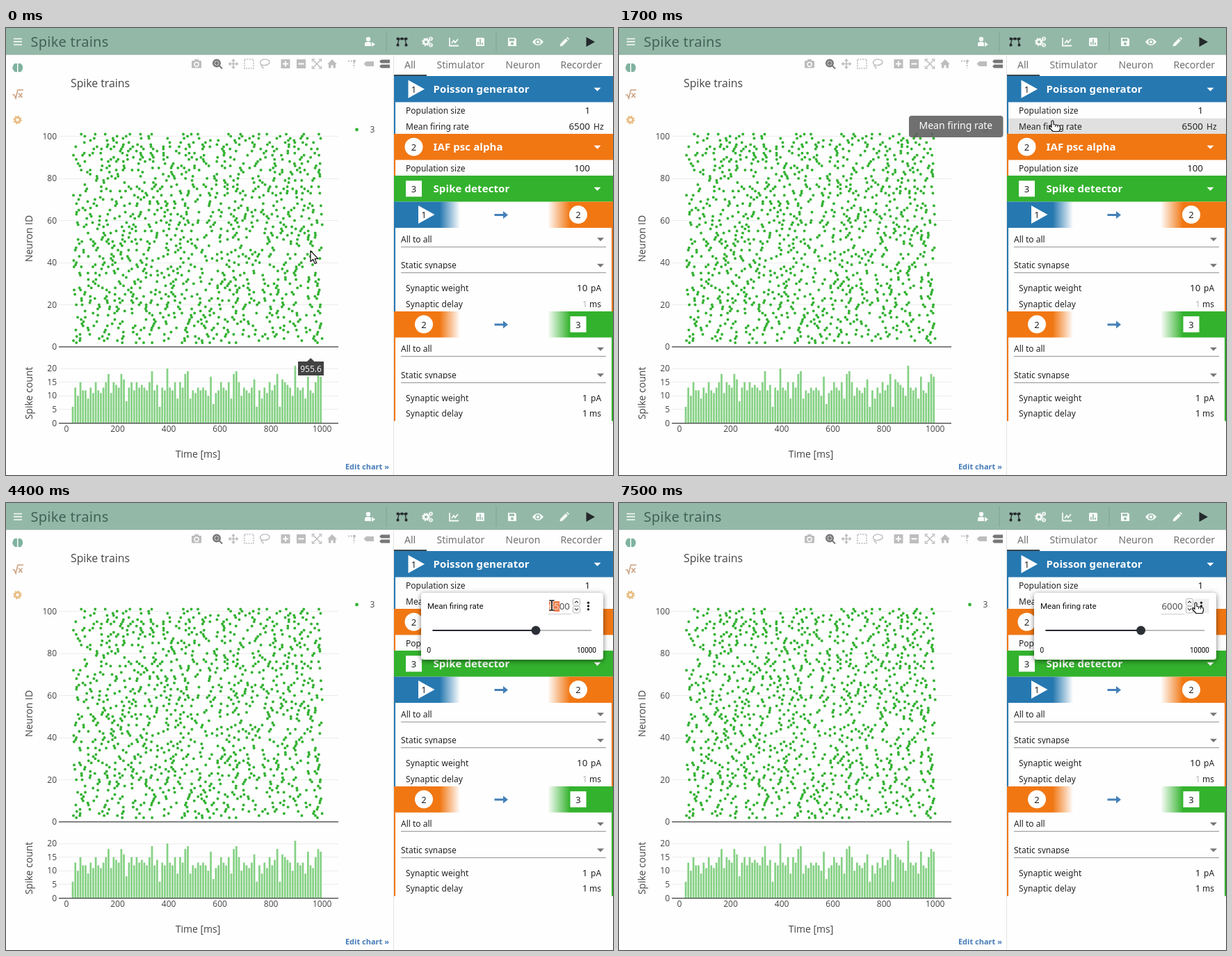
These frames come from a looping animation (873 by 642 pixels, 8 s). An HTML page:

```html
<!DOCTYPE html>
<html lang="en">
<head>
<meta charset="utf-8">
<title>Spike trains</title>
<style>
html, body { margin: 0; width: 100%; height: 100%; overflow: hidden; background: #fff; }
svg { display: block; width: 873px; height: 642px; font: 12px "Noto Sans", "Open Sans", sans-serif; }
.plot { font-family: "Open Sans", "Noto Sans", sans-serif; fill: #444; }
.menu { font-family: Roboto, "Liberation Sans", sans-serif; }
.line { fill: none; stroke-width: 2; }
#pop {
  filter: drop-shadow(0 2px 3px rgba(0,0,0,.35)) drop-shadow(0 1px 5px rgba(0,0,0,.2));
  transform-origin: 597px 129px;
}
</style>
</head>
<body>
<svg id="stage" viewBox="0 0 873 642"></svg>
<script>
const BLUE = '#2678b0', ORANGE = '#f17713', GREEN = '#33b22d', DOT = '#34b233';
const LOOP = 8000, STEP = 100;

const rect = (x, y, w, h, fill, more = '') =>
  `<rect x="${x}" y="${y}" width="${w}" height="${h}" fill="${fill}" ${more}/>`;
const circle = (x, y, r, fill, more = '') =>
  `<circle cx="${x}" cy="${y}" r="${r}" fill="${fill}" ${more}/>`;
const path = (d, fill, more = '') => `<path d="${d}" fill="${fill}" ${more}/>`;
const line = (d, stroke, w = 2, more = '') =>
  `<path class="line" d="${d}" stroke="${stroke}" style="stroke-width:${w}" ${more}/>`;
const text = (x, y, s, more = '') => `<text x="${x}" y="${y}" ${more}>${s}</text>`;
const end = 'text-anchor="end"', mid = 'text-anchor="middle"';
const at = (x, y, body) => `<g transform="translate(${x} ${y})">${body}</g>`;

function random(seed) {
  return () => {
    seed = (seed * 1664525 + 1013904223) % 4294967296;
    return seed / 4294967296;
  };
}

// Icons, each centred on 0,0
const gear = (r, c) => circle(0, 0, r * .62, 'none', `stroke="${c}" stroke-width="${r * .5}"`) +
  circle(0, 0, r * .9, 'none', `stroke="${c}" stroke-width="${r * .35}" stroke-dasharray="${r * .353}"`);
const arrows = c => line('M0-5V5M-5 0H5', c, 1.6) +
  path('M0-7.5L3-4H-3ZM0 7.5L3 4H-3ZM-7.5 0L-4-3V3ZM7.5 0L4-3V3Z', c);

function header() {
  const w = '#f6faf8', d = '#24292b';
  return rect(0, 0, 873, 38, '#94b8a8') + rect(0, 37.5, 873, 1, '#86a99a') +
    line('M11 15.5H23M11 19.7H23M11 24H23', w, 1.7) +
    text(35.5, 27, 'Spike trains', 'font-size="20" letter-spacing=".25" fill="#426057"') +
    rect(546.5, 5, 1, 29, '#7fa293') + rect(704.5, 5, 1, 29, '#7fa293') +
    at(522, 20, circle(-1, -4, 3.2, w) + path('M-6 6V3Q-6 0-3 0H1Q3 0 3 3V6ZM4 0L9 3.5L4 7Z', w)) +
    at(569.5, 20, line('M-5-4.5H5M-4-4Q-6 0-6 4M4-4Q6 0 6 4', d, 1.3) +
      [[-6, -4.5], [6, -4.5], [-6, 4.5], [6, 4.5], [0, -4.5]].map(p => rect(p[0] - 1.8, p[1] - 1.8, 3.6, 3.6, d)).join('')) +
    at(604, 20, gear(5.5, w)) + at(611, 15.5, gear(3, w)) + at(611, 24.5, gear(3, w)) +
    at(644, 20, line('M-6-6V5.5H7M-3 2L0-2L2 1L6-4', w, 1.8)) +
    at(682, 20, rect(-6, -6, 12, 12, w, 'rx="1.5"') + line('M-3 4V0M0 4V-4M3 4V1', '#94b8a8', 1.6)) +
    at(728, 20, path('M-6-6H4L6-4V6H-6Z', w) + rect(-4, -4.5, 7, 3.2, '#94b8a8') + circle(0, 2.5, 2, '#94b8a8')) +
    at(765, 20, path('M-8 0Q0-10 8 0Q0 10-8 0Z', w) + circle(0, 0, 3.6, '#94b8a8') + circle(0, 0, 2, w)) +
    at(803, 20, path('M-6.5 6.5L-5.5 2.5L2-5L5-2L-2.5 5.5ZM3-6L4.5-7L7-4.5L6-3Z', w)) +
    path('M834.5 13V27L847 20Z', d);
}

function sidebar() {
  return path('M16 51V63Q12 64 11 61Q8 58 10 55Q11 50 16 51ZM17.5 51V63Q22 64 23 61Q25 58 24 55Q22 50 17.5 51Z', '#7fb39f') +
    line('M9.5 96H12L14 101L17 89H25M18 93.5L23.5 100M23.5 93.5L18 100', '#cb9f7e', 1.5) +
    at(16.5, 132, gear(5.8, '#e9bd84'));
}

function modebar() {
  const g = '#bdbdbd', d = '#777';
  const box = s => rect(-6.5, -6.5, 13, 13, g) + line(s, '#fff', 2);
  return at(274, 51.5, rect(-7, -4.5, 14, 10.5, g, 'rx="1"') + rect(-3, -6.5, 6, 3, g) +
      circle(0, .8, 3, g, 'stroke="#fff" stroke-width="1.4"')) +
    at(303, 50.5, circle(0, 0, 4.8, '#bbb', `stroke="${d}" stroke-width="2.4"`) + line('M3.5 3.5L8 8M-2.5 0H2.5M0-2.5V2.5', d, 2)) +
    at(327, 51.5, arrows(g)) +
    at(349.5, 51.5, rect(-6.5, -6.5, 13, 13, 'none', `stroke="${g}" stroke-width="1.6" stroke-dasharray="2 1.5"`)) +
    at(372, 50.5, line('M-4 3Q-9-1-4-4.5Q1-7 6-4Q9 0 4 2Q0 4-4 2.5Q-6 4-3 5.5Q-1 7-3 7.5', g, 1.4)) +
    at(402, 51.5, box('M-4 0H4M0-4V4')) + at(424.5, 51.5, box('M-4 0H4')) +
    at(447, 51.5, line('M-6.5-3V-6.5H-3M3-6.5H6.5V-3M6.5 3V6.5H3M-3 6.5H-6.5V3M-5-5L5 5M5-5L-5 5', g, 1.5)) +
    at(469, 51.5, path('M0-6.5L7 .5H5V6H1.5V2H-1.5V6H-5V.5H-7Z', g)) +
    at(497, 51.5, line('M-5-4H3M3.5-2V6', g, 2, 'stroke-dasharray="2 1.6"') + circle(4, -4, 2, g)) +
    at(522, 51.5, path('M-7.5 0L-4-3.5H7V3.5H-4Z', g)) +
    at(545, 51.5, path('M-8-3.5L-5.5-6H7V-1H-5.5ZM-8 3.5L-5.5 1H7V6H-5.5Z', d));
}

const counts = [
  6, 13, 10, 15, 12, 12, 9, 13, 11, 15, 12, 11, 13, 15, 18, 11, 15, 14, 13, 18,
  16, 8, 13, 15, 12, 15, 13, 14, 13, 12, 15, 19, 12, 14, 6, 13, 12, 20, 13, 12,
  15, 9, 15, 13, 18, 19, 9, 12, 11, 13, 12, 13, 12, 10, 17, 7, 11, 12, 15, 13,
  12, 15, 9, 18, 19, 15, 10, 13, 12, 11, 13, 16, 6, 12, 9, 13, 11, 15, 12, 14,
  18, 6, 16, 15, 14, 13, 10, 21, 13, 12, 13, 9, 17, 12, 11, 15, 18, 17
];
const timeX = ms => 87 + ms * .3677;
const idY = id => 458 - id * 3.025;

function spikes() {
  const rnd = random(41), last = Array(102).fill(-99);
  let dots = '', bars = '';
  counts.forEach((n, bin) => {
    const h = n * 3.925;
    bars += rect((timeX(20 + bin * 10) + .3).toFixed(2), 567.5 - h, 2.7, h, '#85d184');
    for (let k = 0; k < n; k++) {
      let id;
      do id = 2 + Math.floor(rnd() * 100); while (bin - last[id] < 3);
      last[id] = bin;
      const x = Math.max(97, timeX(20 + (bin + rnd()) * 10));
      dots += `M${x.toFixed(1)} ${idY(id).toFixed(1)}h0`;
    }
  });
  return bars + line(dots, DOT, 4, 'stroke-linecap="round"');
}

function chart() {
  let s = text(93, 85, 'Spike trains', 'font-size="15.8"');
  const level = (y, label, zero) => {
    s += rect(76, Math.round(y), 402, 1, zero ? 'none' : '#ececec') + text(73, y + 4.5, label, end);
  };
  for (let v = 0; v <= 100; v += 20) level(idY(v) - .5, v, !v);
  for (let v = 0; v <= 20; v += 5) level(567 - v * 3.925, v, !v);
  for (let v = 0; v <= 1000; v += 200) s += text(timeX(v), 580, v, mid);
  s += spikes() + rect(76, 457.3, 402, 1.3, '#444') + rect(76, 567, 402, 1.3, '#444');
  const side = (y, label) => text(0, 0, label, `${mid} font-size="14" transform="translate(38 ${y}) rotate(-90)"`);
  s += side(302.5, 'Neuron ID') + side(524.5, 'Spike count') + text(276, 616.5, 'Time [ms]', mid + ' font-size="14"');
  s += circle(504.5, 146, 2.4, DOT) + text(523.5, 150, '3');
  s += text(551, 634, 'Edit chart »', end + ' font-size="11" font-weight="700" fill="#447bb8"');
  return `<g class="plot">${s}</g>`;
}

const badge = (kind, x, y) =>
  [path(`M${x - 8} ${y - 13}L${x + 15.5} ${y}L${x - 8} ${y + 13}Z`, '#fff'),
   circle(x, y, 13, '#fff'), rect(x - 11.5, y - 11.5, 23, 23, '#fff')][kind - 1] +
  text(x, y + 5, kind, mid + ' font-size="13" fill="#222"');
const caret = (x, y, c) => path(`M${x - 5} ${y - 2.3}H${x + 5}L${x} ${y + 2.7}Z`, c);

const row = (y, label, value, unit = '', valueX = 840, unitX = 845, fill = '#222') =>
  text(575, y, label, 'fill="#222"') +
  text(valueX, y, value, `${end} font-size="13.33" fill="${fill}"`) +
  text(unitX, y, unit, 'fill="#222"');

const synapse = (y, weight, delayFill) => `<g letter-spacing=".1">` +
  row(y, 'Synaptic weight', weight, 'pA', 836.5, 841) +
  row(y + 22.5, 'Synaptic delay', 1, 'ms', 836.5, 839, delayFill) + '</g>';

const node = (y, h, kind, color, name) =>
  rect(558, y, 2, h, color) + rect(558, y, 315, 37.5, color) + badge(kind, 586.5, y + 18.8) +
  text(614.5, y + 24, name, 'font-size="15" font-weight="700" letter-spacing=".1" fill="#fff"') +
  caret(850.5, y + 19, '#fff');

const select = (y, label) => text(568, y, label, 'fill="#222"') + rect(568, y + 1.3, 90, 4, '#fefefe') +
  rect(568, Math.round(y + 6), 295, 1, '#949494') + caret(855, y - 4, '#757575');

function link(y, from, to, a, b) {
  const fade = (id, c, x1, x2) => `<linearGradient id="${id}" x1="${x1}" x2="${x2}">` +
    `<stop stop-color="${c}"/><stop offset="1" stop-color="${c}" stop-opacity="0"/></linearGradient>`;
  return `<defs>${fade('l' + y, a, 0, 1)}${fade('r' + y, b, 1, 0)}</defs>` +
    rect(558, y, 2, 157.5, a) + rect(871, y, 2, 157.5, b) +
    rect(558, y, 66, 37.5, a) + rect(624, y, 29, 37.5, `url(#l${y})`) +
    rect(779, y, 32, 37.5, `url(#r${y})`) + rect(811, y, 62, 37.5, b) +
    badge(from, 601, y + 18.6) + badge(to, 823, y + 18.6) +
    path(`M702.5 ${y + 17.5}H715V${y + 13.5}L722 ${y + 19}L715 ${y + 24.5}V${y + 20.5}H702.5Z`, '#4480b8') +
    select(y + 58, 'All to all') + select(y + 95.5, 'Static synapse');
}

function panel() {
  const tab = (x, s) => text(x, 58, s, 'font-size="14" fill="#707070"');
  return rect(557, 38, 1, 604, '#e2e2e2') +
    tab(573, 'All') + tab(619.5, 'Stimulator') + tab(718.5, 'Neuron') + tab(797.5, 'Recorder') +
    rect(558, 67, 47, 2, '#37474f') +
    rect(560, 0, 313, 22.5, '#f2f2f2', 'id="hover"') +
    node(69, 83.5, 1, BLUE, 'Poisson generator') +
    row(123, 'Population size', 1) + row(145.5, 'Mean firing rate', 6500, 'Hz') +
    node(152, 60, 2, ORANGE, 'IAF psc alpha') + row(205.5, 'Population size', 100) +
    node(212, 37.5, 3, GREEN, 'Spike detector') +
    link(249.5, 1, 2, BLUE, ORANGE) + synapse(378, 10, '#bbb') +
    link(407, 2, 3, ORANGE, GREEN) + synapse(535.5, 1);
}

function popup() {
  return `<g id="pop">` + rect(597, 129, 262, 96, '#fff', 'rx="4"') +
    text(606, 152, 'Mean firing rate', 'class="menu" font-size="11.6" fill="#111"') +
    rect(780, 159, 33, 1, '#ccc') + rect(781, 141, 15.2, 15, '#ee7f50', 'id="mark"') +
    text(780.5, 153, '', 'id="value" font-size="13.33" fill="#505050"') +
    rect(795.7, 141, 1, 14, '#222', 'id="blink"') +
    [137, 148].map(y => rect(815.5, y + .5, 10, 9.5, '#fff', 'rx="2" stroke="#b5b5b5"')).join('') +
    line('M818 143.5L820.5 141L823 143.5M818 151.5L820.5 154L823 151.5', '#444', 1.2) +
    text(831.5, 153, 'Hz', 'id="unit" fill="#222"') +
    `<g id="dots">${rect(827.5, 137.5, 21, 21, '#efefef', 'id="press"')}` +
    [143.2, 148, 152.8].map(y => circle(837.5, y, 1.7, '#222')).join('') + '</g>' +
    rect(613.5, 182, 228.5, 2, '#bcbcbc') + rect(613.5, 182, 149, 2, '#24282c', 'id="fill"') +
    circle(762, 183, 6.5, '#2b3036', 'id="thumb"') +
    text(605.5, 215, '0', 'class="menu" font-size="10"') +
    text(849, 215, '10000', end + ' class="menu" font-size="10"') + '</g>';
}

function overlays() {
  const out = 'stroke="#111" stroke-width="1.2" stroke-linejoin="round"';
  return `<g id="tag" class="plot">` + path('M420 479H433L438.2 474L443.5 479H457V499H420Z', '#424242') +
    text(438.5, 493.5, '955.6', mid + ' id="tagText" fill="#fff"') + '</g>' +
    `<g id="tip">` + rect(417, 126, 135.5, 31, '#616161', 'rx="4" fill-opacity=".9"') +
    text(431.5, 145, 'Mean firing rate', 'font-size="14" fill="#fff"') + '</g>' + popup() +
    `<g id="arrow">${path('M0 0V15.5L3.6 12.3L6.3 18.5L8.8 17.4L6.2 11.4H11Z', '#fff', out)}</g>` +
    `<g id="hand">${path('M-2 1.5Q-2 0-.5 0Q1 0 1 1.5V5.5L8.5 7Q10.5 7.5 10.5 9.5V12L9 15.5H0L-5 10Q-6 8-4 7.7L-2 9.5Z', '#fff', out)}${line('M3.5 7V9M6.5 7.5V9.5', '#111', 1)}</g>` +
    `<g id="beam">${['#fff', '#111'].map((c, i) => line('M-3.5-7H-1L0-6L1-7H3.5M0-6V6M-3.5 7H-1L0 6L1 7H3.5', c, i ? 1.6 : 3.4)).join('')}</g>`;
}

document.getElementById('stage').innerHTML =
  rect(0, 0, 873, 642, '#fefefe') + header() + sidebar() + modebar() + chart() + panel() + overlays();

const el = {};
document.querySelectorAll('svg [id]').forEach(e => el[e.id] = e);
const show = (e, on) => e.setAttribute('opacity', +on);

// time, x, y of the pointer
const track = [
  [0, 438, 320], [100, 439, 313], [300, 439, 313], [1100, 624, 136], [1200, 624, 136],
  [1300, 624, 133], [1900, 624, 133], [2000, 624, 134], [2100, 624, 134], [2700, 770.5, 154],
  [2800, 770.5, 154], [2900, 797.5, 152], [3000, 797.5, 152], [3100, 795.7, 150],
  [4200, 795.7, 150], [4400, 785, 147], [6600, 785, 147], [7000, 829, 144],
  [7400, 829, 144], [7500, 830, 143], [LOOP, 830, 143]
];
const hoverRows = [107, 129.7, 189.5];

function pointer(t) {
  const i = track.findIndex(k => k[0] > t), a = track[i - 1], b = track[i];
  let u = (t - a[0]) / (b[0] - a[0]);
  u = u * u * (3 - 2 * u);
  return [a[1] + (b[1] - a[1]) * u, a[2] + (b[2] - a[2]) * u];
}

function pointerKind(t, x) {
  if (t < 2000) return x < 558 ? 'arrow' : 'hand';
  if (t < 2700) return 'arrow';
  if (t <= 6600 || x < 812) return 'beam';
  return x < 827 ? 'arrow' : 'hand';
}

const easeOut = u => 1 - (1 - Math.min(1, Math.max(0, u))) ** 3;
const rate = t => t < 6600
  ? 6500 - 5900 * easeOut((t - 6199) / 400)
  : 600 + 5400 * easeOut((t - 6600) / 400);
const ramp = (t, from, to) => Math.min(1, Math.max(0, (t - from) / (to - from)));

function draw(t) {
  const [x, y] = pointer(t), kind = pointerKind(t, x);
  for (const k of ['arrow', 'hand', 'beam']) show(el[k], k === kind);
  el[kind].setAttribute('transform', `translate(${x} ${y})`);

  show(el.tag, t < 400);
  el.tagText.textContent = t < 100 ? '955.6' : '957.1';
  show(el.tip, ramp(t, 1300, 1600) * (1 - ramp(t, 1900, 2200)));

  const hot = t < 2200 && x > 558 ? hoverRows.find(r => y >= r && y < r + 22.6) : undefined;
  show(el.hover, hot !== undefined);
  if (hot !== undefined) el.hover.setAttribute('y', hot);
  el.hover.setAttribute('fill', t >= 1700 ? '#e0e0e0' : '#f2f2f2');

  const open = ramp(t, 1800, 2000);
  show(el.pop, open);
  el.pop.style.transform = `scale(${.8 + .2 * open})`;

  const menu = t >= 2300;
  show(el.unit, !menu);
  show(el.dots, menu);
  show(el.press, t > 6600 && x > 827);
  show(el.blink, t >= 3100 && t < 3800);

  const marked = t >= 4300 && t < 6200, from = t < 4400 ? 1 : 0;
  show(el.mark, marked);
  el.mark.setAttribute('x', 781 + from * 7.6);
  el.mark.setAttribute('width', 15.2 - from * 7.6);
  el.value.innerHTML = marked
    ? '65'.slice(0, from) + `<tspan fill="#fbd9c8">${'65'.slice(from)}</tspan>00`
    : t < 6200 ? '6500' : t < 6600 ? '600' : '6000';

  const thumb = 613.5 + rate(t) * .02285;
  el.thumb.setAttribute('cx', thumb);
  el.fill.setAttribute('width', thumb - 613.5);
}

function tick() {
  draw(Math.floor(performance.now() % LOOP / STEP) * STEP);
  requestAnimationFrame(tick);
}
tick();
</script>
</body>
</html>
```
